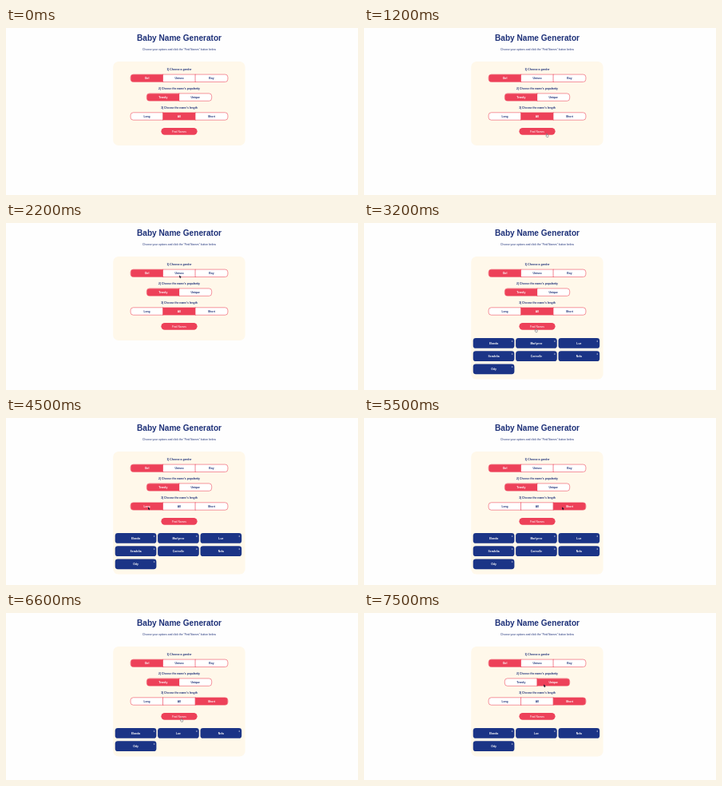
Recreate the animation shown at these times as an HTML page with a canvas. Size 441 px wide and 209 px high, loop 8 s.

```html
<!DOCTYPE html>
<html lang="en">
<head>
<meta charset="utf-8">
<title>Baby Name Generator</title>
<style>
  html, body { margin: 0; width: 100%; height: 100%; overflow: hidden; background: #fefefe; }
  canvas { display: block; width: 100vw; height: 100vh; }
</style>
</head>
<body>
<canvas id="stage"></canvas>
<script>
const W = 441, H = 209, LOOP = 8000, REM = 3.37, MID = 217;
const RED = '#ed4159', NAVY = '#1b3486', INK = '#1d3078', CREAM = '#fff8ea';
const CELL = { w: 12 * REM, h: 8.9 };
const CARD = { x: 136.7, y: 144, w: 51.7, h: 12.8, stepX: 53.4, stepY: 16.2 };

const canvas = document.getElementById('stage');
const ctx = canvas.getContext('2d');

const allNames = ['Elanda', 'Marlynne', 'Lue', 'Serafelia', 'Corinelle', 'Nela', 'Ody'];
const shortNames = allNames.filter(name => name.length < 7 && name !== 'Marlynne');

const groups = [
  { title: '1) Choose a gender', y: 62.8, options: ['Girl', 'Unisex', 'Boy'] },
  { title: "2) Choose the name's popularity", y: 86.6, options: ['Trendy', 'Unique'] },
  { title: "3) Choose the name's length", y: 110.5, options: ['Long', 'All', 'Short'] }
];

// picks: active option per group; cursor: [shape, x, y]
const states = [
  { at: 0, picks: [0, 0, 1], names: [] },
  { at: 1200, picks: [0, 0, 1], names: [], cursor: ['hand', 227.6, 131.8] },
  { at: 2200, picks: [0, 0, 1], names: [], cursor: ['arrow', 217.2, 65.2] },
  { at: 3200, picks: [0, 0, 1], names: allNames, cursor: ['hand', 213.8, 131.8] },
  { at: 3800, picks: [0, 0, 1], names: allNames, cursor: ['arrow', 208, 126.4] },
  { at: 4500, picks: [0, 0, 0], names: allNames, cursor: ['arrow', 178, 111.2] },
  { at: 5500, picks: [0, 0, 2], names: allNames, cursor: ['arrow', 248.2, 111.2] },
  { at: 6600, picks: [0, 0, 2], names: shortNames, cursor: ['hand', 218.3, 131.4] },
  { at: 7500, picks: [0, 1, 2], names: shortNames, cursor: ['arrow', 225.2, 89.2] }
];

function box(x, y, w, h, radius, fill) {
  ctx.beginPath();
  ctx.roundRect(x, y, w, h, radius);
  ctx.fillStyle = fill;
  ctx.fill();
}

function label(text, x, y, color, weight = 'bold', size = REM) {
  ctx.font = `${weight} ${size}px "Liberation Sans", Arial, sans-serif`;
  ctx.textAlign = 'center';
  ctx.fillStyle = color;
  ctx.fillText(text, x, y + size * 0.36);
}

function drawGroup({ title, y, options }, active) {
  const left = MID - options.length * CELL.w / 2;
  const top = y - CELL.h / 2;
  label(title, MID, y - 11, INK);
  options.forEach((option, i) => {
    const x = left + i * CELL.w;
    const l = i === 0 ? REM : 0;
    const r = i === options.length - 1 ? REM : 0;
    box(x, top, CELL.w, CELL.h, [l, r, r, l], i === active ? RED : '#fff');
    ctx.beginPath();
    ctx.roundRect(x - 0.25, top - 0.25, CELL.w + 0.5, CELL.h + 0.5, [l, r, r, l]);
    ctx.strokeStyle = RED;
    ctx.lineWidth = 0.55;
    ctx.stroke();
    label(option, x + CELL.w / 2, y, i === active ? '#fff' : INK);
  });
}

function drawCard(name, i) {
  const x = CARD.x + i % 3 * CARD.stepX;
  const y = CARD.y + Math.floor(i / 3) * CARD.stepY;
  box(x, y, CARD.w, CARD.h, REM, NAVY);
  label(name, x + CARD.w / 2, y + CARD.h / 2, '#fff');
  label('x', x + CARD.w * 0.945, y + 3.4, '#fff', 'normal');
}

const cursors = {
  arrow() {
    ctx.fillStyle = '#15152a';
    ctx.fill(new Path2D('M0 0L0 3.5L.8 2.8L1.4 4L2 3.7L1.5 2.6L2.6 2.5Z'));
  },
  hand() {
    const shape = new Path2D('M1 .5Q1.4 0 1.8 .5V1.9L3.3 2.3Q3.6 2.6 3.4 3.5L3 4.8H1.3L.2 3.1Q.3 2.6 1 3Z');
    ctx.fillStyle = '#fff';
    ctx.fill(shape);
    ctx.strokeStyle = '#333';
    ctx.lineWidth = 0.4;
    ctx.stroke(shape);
  }
};

function drawCursor([shape, x, y]) {
  ctx.save();
  ctx.translate(x, y);
  cursors[shape]();
  ctx.restore();
}

function draw(state) {
  ctx.fillStyle = '#fefefe';
  ctx.fillRect(0, 0, W, H);
  label('Baby Name Generator', MID, 12.6, INK, 'bold', REM * 3);
  label('Choose your options and click the "Find Names" button below', MID, 26.9, INK, 'normal');

  const rows = Math.ceil(state.names.length / 3);
  box(134.2, 42, 165.4, 105 + rows * CARD.stepY, REM * 2, CREAM);
  groups.forEach((group, i) => drawGroup(group, state.picks[i]));
  box(MID - 22.6, 124.9, 45.2, CELL.h, CELL.h / 2, RED);
  label('Find Names', MID, 129.4, '#fff', 'normal');
  state.names.forEach(drawCard);
  if (state.cursor) drawCursor(state.cursor);
}

function resize() {
  const ratio = window.devicePixelRatio || 1;
  canvas.width = Math.round(innerWidth * ratio);
  canvas.height = Math.round(innerHeight * ratio);
  ctx.setTransform(canvas.width / W, 0, 0, canvas.height / H, 0, 0);
}

function tick() {
  const time = performance.now() % LOOP;
  draw(states.findLast(state => state.at <= time));
  requestAnimationFrame(tick);
}

addEventListener('resize', resize);
resize();
tick();
</script>
</body>
</html>
```
